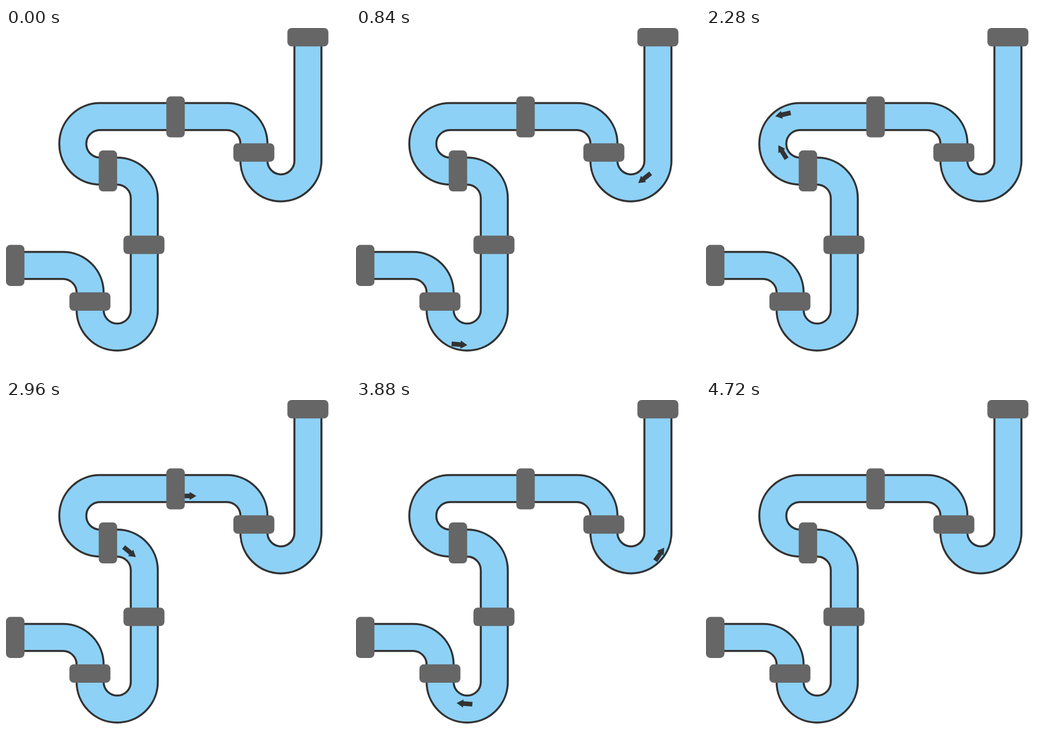
An HTML page that plays this animation: 640 by 640 pixels, repeating every 4.8 s.

```html
<!DOCTYPE html>
<html lang="en">
<head>
<meta charset="utf-8">
<title>Two-way pipe flow</title>
<style>
  html, body { margin: 0; width: 100%; height: 100%; overflow: hidden; background: #fff; }
  svg { display: block; width: 100%; height: 100%; }
  .pipe { fill: none; stroke: #333; stroke-width: 54; }
  .water { stroke: #8dd1f7; stroke-width: 46.5; }
  .joints { fill: #666; }
  .arrow {
    fill: #333;
    offset-rotate: auto;
    animation: flow 4.8s steps(120, jump-none) infinite;
  }
  @keyframes flow {
    from { offset-distance: 0%; }
    to { offset-distance: 100%; }
  }
</style>
</head>
<body>
<svg viewBox="0 0 640 640">
  <defs>
    <path id="arrow" d="M14.7 0 L2.2 -7.5 V-4.3 H-14.7 V4.3 H2.2 V7.5 Z"/>
    <rect id="flat" width="76.3" height="34.3" rx="8"/>
    <rect id="tall" width="34.3" height="76.3" rx="8"/>
  </defs>
  <path class="pipe"/>
  <path class="pipe water"/>
  <g class="arrow" id="down"><use href="#arrow"/></g>
  <g class="arrow" id="up"><use href="#arrow"/></g>
  <g class="joints">
    <use href="#flat" x="523.5" y="0"/>
    <use href="#flat" x="423" y="214.5"/>
    <use href="#tall" x="298.3" y="127.3"/>
    <use href="#tall" x="172.5" y="227.8"/>
    <use href="#flat" x="218.5" y="386.2"/>
    <use href="#flat" x="118" y="491.8"/>
    <use href="#tall" x="0" y="403.6"/>
  </g>
</svg>
<script>
  // Point on the way from a to b, at most one radius and half the way along.
  function toward(a, b, radius) {
    const length = Math.hypot(b.x - a.x, b.y - a.y);
    const k = Math.min(radius, length / 2) / length;
    return { x: a.x + (b.x - a.x) * k, y: a.y + (b.y - a.y) * k };
  }

  // Right-angled route with rounded corners; stops alternate between the axes.
  function route(radius, start, axis, stops) {
    const points = [start];
    for (const stop of stops) {
      points.push({ ...points.at(-1), [axis]: stop });
      axis = axis === "x" ? "y" : "x";
    }
    let d = `M${start.x} ${start.y}`;
    for (let i = 1; i < points.length - 1; i++) {
      const p = points[i];
      const a = toward(p, points[i - 1], radius);
      const b = toward(p, points[i + 1], radius);
      const cross = (p.x - a.x) * (b.y - p.y) - (p.y - a.y) * (b.x - p.x);
      const rx = Math.abs(b.x - a.x), ry = Math.abs(b.y - a.y);
      d += ` L${a.x} ${a.y} A${rx} ${ry} 0 0 ${cross > 0 ? 1 : 0} ${b.x} ${b.y}`;
    }
    const end = points.at(-1);
    return `${d} L${end.x} ${end.y}`;
  }

  const pipe = route(50.5, { x: 561.7, y: 15 }, "y",
    [297.4, 461.3, 164.7, 124.3, 266.2, 257.3, 575, 156.5, 441.7, 15]);
  const lanes = {
    down: route(40, { x: 552, y: -1 }, "y",
      [288, 466, 160, 112, 274, 245, 565, 165, 433.5, 0]),
    up: route(56, { x: -11, y: 454 }, "x",
      [141, 589, 269, 254, 138, 178.5, 442, 311, 575, -15])
  };

  for (const el of document.querySelectorAll(".pipe")) el.setAttribute("d", pipe);
  for (const [id, d] of Object.entries(lanes)) {
    document.getElementById(id).style.offsetPath = `path("${d}")`;
  }
</script>
</body>
</html>
```
